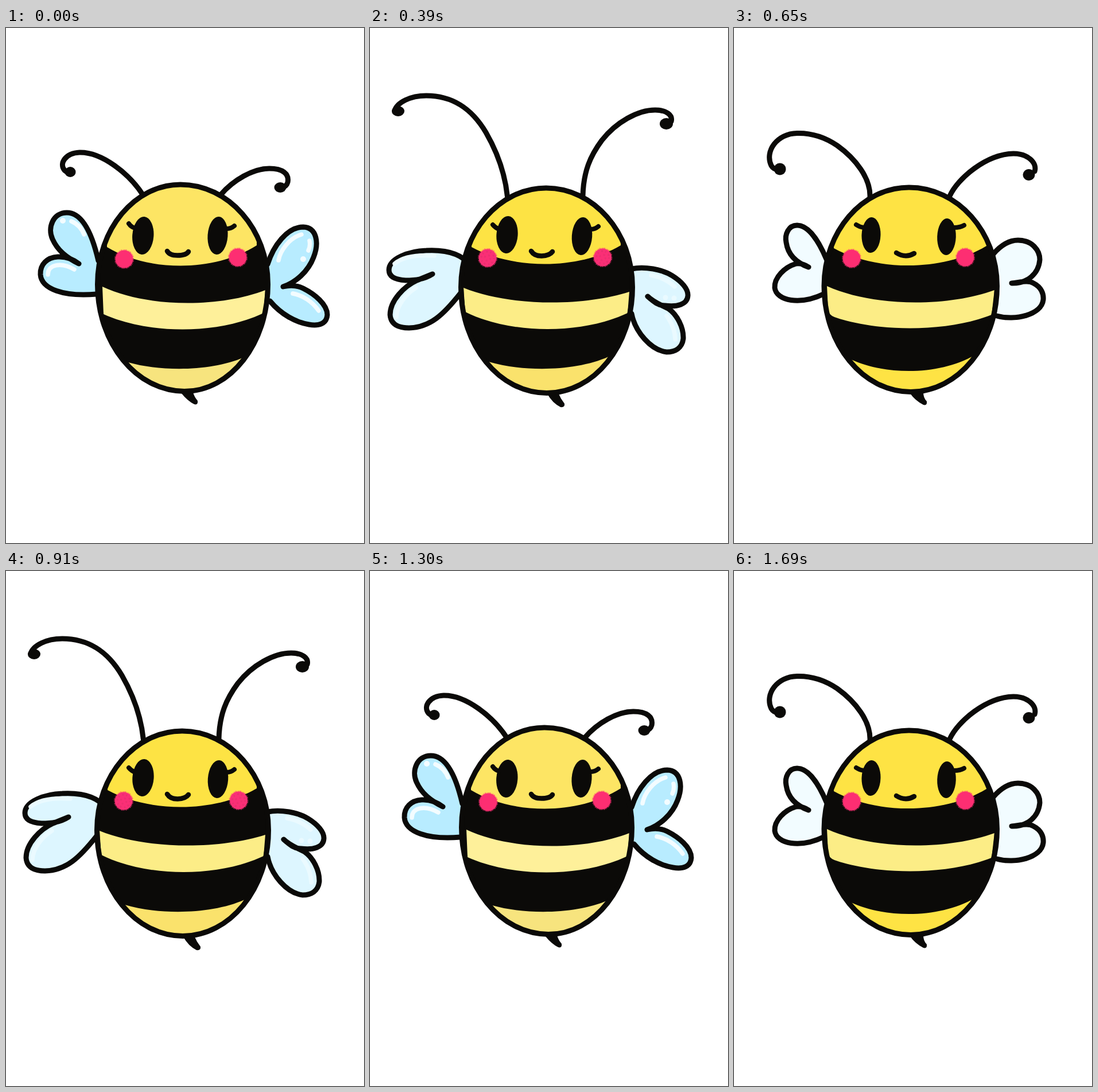
An HTML page for the animation above (1820 ms loop, 624 by 898 pixels).

```html
<!DOCTYPE html>
<html lang="en">
<head>
<meta charset="utf-8">
<title>Bee</title>
<style>
html, body { margin: 0; width: 100%; height: 100%; overflow: hidden; background: #fff; }
svg { display: block; width: 100vw; height: 100vh; }
</style>
</head>
<body>
<svg id="stage" viewBox="0 0 624 898" xmlns="http://www.w3.org/2000/svg"></svg>
<script>
const INK = '#0b0a08';
const STEP = 130, STEPS = 14;

const poses = {
  middle: {
    body: [159.5, 273, 456.5, 633.5, 447, 304, 311],
    fills: ['#fde564', '#fef09a', '#f7e47e'],
    head: [176, 382, 414.5, 437, 379],
    bandTop: [168, 451, 479.5, 452, 457],
    bandLow: [449, 497, 525.5, 170, 499],
    tail: [213, 583, 594, 415, 574],
    sting: 'M305 636L326 635Q328 643 334 650Q335 658 328 656Q316 650 305 636Z',
    eyes: [[238.8, 362, 18.6, 33, 4], [369, 362, 17.5, 33, 4]],
    lashes: 'M214 341Q218 347 225 349M385 350Q392 350 398 345',
    mouth: 'M281 389Q285 396.5 299 396.5Q314 396.5 318 390',
    cheeks: [[206, 403], [404, 400]],
    antennae: 'M238 290C215 255 168 216 128 217C104 218 92 236 102 248Q106 252 112 251' +
      'M374 291C396 265 431 245 459 245C482 245 494 254 491 269Q489 277 480 278',
    tips: [[112, 251, 9.5, 9], [478, 278, 10.5, 9]],
    wing: '#b8ecff',
    wings: [
      'M161 406C155 380 140 322 106 322C82 322 72 348 81 368C90 388 105 400 127 411C118 404 105 398 90 399C72 400 59 412 60 430C62 455 100 469 158 464',
      'M456 412C466 380 490 347 518 347C542 348 546 375 536 400C527 424 505 444 483 451C495 448 508 449 518 454C538 464 560 482 560 500C559 516 545 520 528 517C505 513 480 500 460 476'
    ],
    shine: '#f3fcff',
    gloss: 'M114 337Q130 344 136 360M73 430C73 412 96 408 119 421' +
      'M475 405C478 388 494 366 515 360M529 371Q531 380 527 388M500 463C517 466 534 477 545 493',
    dots: [[99, 336, 5], [518, 403, 5]]
  },
  low: {
    body: [158.5, 279, 457.5, 636.5, 452, 307, 308],
    fills: ['#fde344', '#fced87', '#fae26c'],
    head: [177, 382, 411.5, 437, 379],
    bandTop: [163, 453, 478.5, 452, 460],
    bandLow: [449, 497, 525, 166, 495],
    tail: [207, 582, 594, 416, 573],
    sting: 'M309 638L328 636Q332 646 339 655Q340 662 332 661Q318 654 309 638Z',
    eyes: [[239, 360.5, 18.6, 32.5, 4], [369.5, 363, 17.7, 33, 4]],
    lashes: 'M214 343Q218 348 225 351M385 351Q392 351 398 346',
    mouth: 'M281 389Q286 397.5 299 397.5Q313 397 318 390',
    cheeks: [[205, 401], [405.5, 400]],
    rough: true,
    antennae: 'M239.5 294C235 250 221 215 202 182C177 140 144 118 98 118C70 118 47 130 43 144' +
      'M371 293C372 250 384 223 404 196C429 164 467 143 497 143C517 143 528 152 525 163',
    tips: [[49, 145, 11, 9], [516.5, 167, 11.5, 10]],
    wing: '#ddf6ff',
    wings: [
      'M164 403C145 388 115 387 98 388C68 389 33 402 33 422C33 434 45 439 62 440C80 440 95 438 109 429L82 440C60 450 35 475 35 500C36 517 50 523 68 523C105 522 128 500 158 462',
      'M456 420C478 415 510 421 527 432C543 442 555 455 554 467C553 482 535 487 514 484C503 484 495 478 484 468C495 479 510 484 521 490C535 500 547 522 546 542C544 558 532 565 517 565C490 562 462 530 456 498'
    ],
    shine: '#eafaff',
    gloss: 'M43 411C56 400 80 395 112 397M46 504C46 485 62 464 80 453' +
      'M490 431Q515 436 531 451M517 502Q531 520 532 543',
    dots: [[515, 470, 4.5], [530, 471, 4.5]]
  },
  high: {
    body: [157, 278, 458.5, 634.5, 450, 305, 308],
    fills: ['#fee344', '#fced86', '#fee344'],
    head: [174, 384, 414, 440, 380],
    bandTop: [162, 450, 478.5, 454, 457],
    bandLow: [449, 500, 523.5, 175, 504],
    corner: 'Q165 500 164 491',
    tail: [204, 578, 598, 420, 570],
    sting: 'M306 636L330 635Q330 645 336 651Q337 659 330 657Q316 650 306 636Z',
    eyes: [[239, 361, 16.5, 31, 2], [370.5, 364, 16.3, 32, 2]],
    lashes: 'M213 343Q219 347 226 348M384 348Q394 348 401 344',
    mouth: 'M283 392Q299 402 314 393',
    cheeks: [[205, 402], [403, 400]],
    antennae: 'M237 294C238 262 212 228 180 205C155 188 130 183 110 183.5C75 184 53 215 65 240Q69 247 78 246' +
      'M376 293C390 262 440 220 487 219C512 219 529 235 524 250',
    tips: [[80, 246, 10.5, 10.5], [514, 256, 10.5, 10]],
    wing: '#f2fcff',
    wings: [
      'M161 403C148 372 130 344 110 344C95 344 88 360 91 374C94 395 108 409 130 417C124 413 116 410 108 411C88 417 70 435 71 453C74 476 115 484 158 463',
      'M452 394C465 379 480 370 495 370C520 370 533 388 533 404C531 428 512 446 484 445C498 444 512 439 522 445C536 452 540 464 539 474C536 500 490 511 458 502'
    ],
    shine: 'none', gloss: '', dots: []
  }
};

const line = (d, w, color = INK, fill = 'none') =>
  `<path d="${d}" fill="${fill}" stroke="${color}" stroke-width="${w}" stroke-linecap="round" stroke-linejoin="round"/>`;
const shape = (d, fill, extra = '') => `<path d="${d}" fill="${fill}" ${extra}/>`;
const oval = (x, y, rx, ry, fill = INK, turn = 0) =>
  `<ellipse cx="${x}" cy="${y}" rx="${rx}" ry="${ry}" fill="${fill}" transform="rotate(${turn} ${x} ${y})"/>`;

// Sagging curve between two ends whose middle reaches height mid.
function arc([x0, y0, mid, x1, y1]) {
  const y = (8 * mid - y0 - y1) / 6, dx = (x1 - x0) * 0.28;
  return `${x0} ${y0}C${x0 + dx} ${y} ${x1 - dx} ${y} ${x1} ${y1}`;
}

function egg([l, t, r, b, mid, tx, bx]) {
  const k = 0.5523, up = mid - (mid - t) * k, dn = mid + (b - mid) * k;
  return `M${tx} ${t}C${tx + (r - tx) * k} ${t} ${r} ${up} ${r} ${mid}` +
    `C${r} ${dn} ${bx + (r - bx) * k} ${b} ${bx} ${b}` +
    `C${bx - (bx - l) * k} ${b} ${l} ${dn} ${l} ${mid}` +
    `C${l} ${up} ${tx - (tx - l) * k} ${t} ${tx} ${t}Z`;
}

function cheek([x, y], rough) {
  const ring = (r, w, dash, color, alpha) =>
    `<circle cx="${x}" cy="${y}" r="${r}" fill="none" stroke="${color}" stroke-width="${w}" stroke-dasharray="${dash}" opacity="${alpha}"/>`;
  const pink = rough ? '#fa2f76' : '#fd2e72';
  return oval(x, y, 15.4, 15.4, pink) +
    ring(16, 2.2, '1.6 0.9 2.4 1.5 0.8 1.1', pink, 0.6) +
    (rough ? ring(11, 3, '2 5 3 4', '#d92f6a', 0.5) + ring(5, 3, '3 5', '#d92f6a', 0.4) : '');
}

function bee(name, p) {
  const outline = egg(p.body), clip = `clip-path="url(#${name}Clip)"`;
  return `<g id="${name}" display="none"><clipPath id="${name}Clip"><path d="${outline}"/></clipPath>` +
    p.wings.map(d => line(d, 9, INK, p.wing)).join('') +
    line(p.gloss, 7.5, p.shine) +
    p.dots.map(([x, y, r]) => oval(x, y, r, r, p.shine)).join('') +
    line(p.antennae, 9) +
    p.tips.map(t => oval(...t)).join('') +
    shape(p.sting, INK) +
    shape(outline, INK) +
    shape(`M${arc(p.head)}V250H${p.head[0]}Z`, p.fills[0], clip) +
    shape(`M${arc(p.bandTop)}L${arc(p.bandLow)}${p.corner || ''}Z`, p.fills[1], clip) +
    shape(`M${arc(p.tail)}V660H${p.tail[0]}Z`, p.fills[2], clip) +
    line(outline, 9) +
    p.eyes.map(([x, y, rx, ry, turn]) => oval(x, y, rx, ry, INK, turn)).join('') +
    line(p.lashes, 8) + line(p.mouth, 8.5) +
    p.cheeks.map(c => cheek(c, p.rough)).join('') + '</g>';
}

const stage = document.getElementById('stage');
const names = Object.keys(poses);
stage.innerHTML = names.map(n => bee(n, poses[n])).join('');
const groups = names.map(n => document.getElementById(n));

// The flap swings high and low, passing the middle each time.
const swing = ['middle', 'high', 'middle', 'low'];
function draw(ms) {
  const pose = swing[Math.floor(ms / STEP) % STEPS % swing.length];
  groups.forEach(g => g.setAttribute('display', g.id === pose ? 'inline' : 'none'));
}

const start = performance.now();
function tick(now) {
  draw(Math.max(0, now - start));
  requestAnimationFrame(tick);
}
draw(0);
requestAnimationFrame(tick);
</script>
</body>
</html>
```
